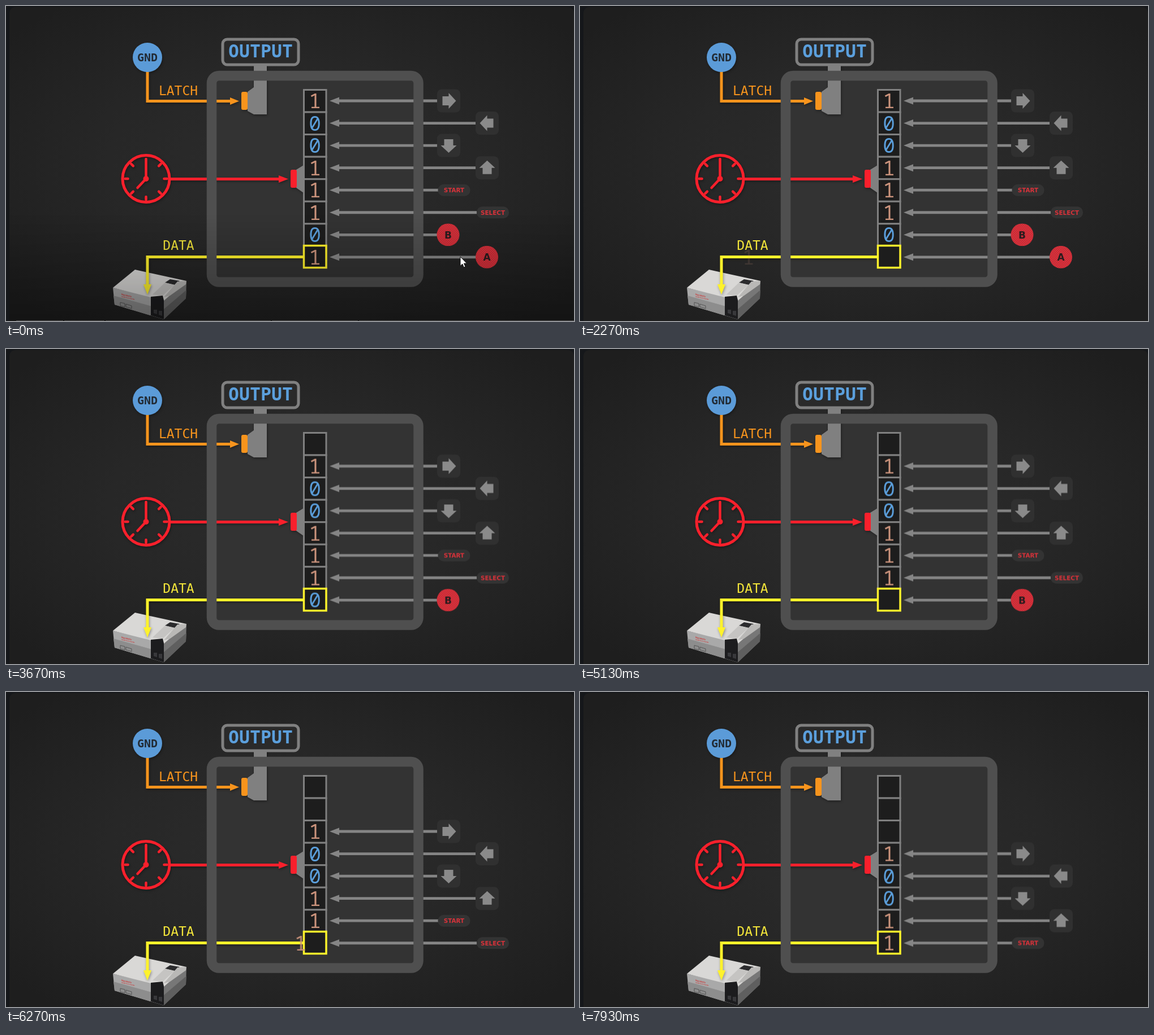
Animation, 1004 px wide and 558 px high, one loop 8000 ms. Source, as an HTML page:

```html
<!DOCTYPE html>
<html lang="en">
<head>
<meta charset="utf-8">
<title>Shift register</title>
<style>
html, body { margin: 0; width: 100%; height: 100%; overflow: hidden; background: #15171a; }
svg { display: block; width: 100vw; height: 100vh; }
text { text-anchor: middle; }
.label { font: 23px "DejaVu Sans Mono", monospace; }
.bold { font-weight: 700; }
.bit { font: 36px "Noto Sans Mono", monospace; fill: #cb937c; }
.zero { fill: #5b9fdc; }
.pad { font: 700 10.4px "DejaVu Sans", sans-serif; fill: #d9323a; }
.round { font: 700 17px "DejaVu Sans", sans-serif; fill: #2b1c1e; }
.wire { fill: none; stroke-width: 5; }
.shadow { filter: drop-shadow(1px 2px 2px rgba(0, 0, 0, .35)); }

#rows, .out7, .out6, .out5, .fade7, .fade6, .fade5, #cursor, #shade, #bezel {
  animation: 8s linear infinite both;
}
#rows { animation-name: shift; animation-timing-function: ease-in-out; }
.out7, .out6, .out5 { animation-timing-function: cubic-bezier(.45, 0, .55, 1); }
.out7 { animation-name: out7; }
.out6 { animation-name: out6; }
.out5 { animation-name: out5; }
.fade7 { animation-name: fade7; }
.fade6 { animation-name: fade6; }
.fade5 { animation-name: fade5; }
#cursor { animation-name: cursor; }
#shade { animation-name: shade; }
#bezel { animation-name: bezel; }

@keyframes shift {
  0%, 38.375% { transform: translateY(0); }
  44.125%, 65.875% { transform: translateY(39.5px); }
  71.625%, 93.375% { transform: translateY(79px); }
  98.75%, 100% { transform: translateY(118.5px); }
}
@keyframes out7 {
  0%, 21.25% { transform: none; opacity: 1; }
  31.25%, 100% { transform: translateX(-296px); opacity: 0; }
}
@keyframes out6 {
  0%, 48.75% { transform: none; opacity: 1; }
  58.75%, 100% { transform: translateX(-296px); opacity: 0; }
}
@keyframes out5 {
  0%, 76.25% { transform: none; opacity: 1; }
  86.25%, 100% { transform: translateX(-296px); opacity: 0; }
}
@keyframes fade7 { 0%, 38.375% { opacity: 1; } 41%, 100% { opacity: 0; } }
@keyframes fade6 { 0%, 65.875% { opacity: 1; } 68.5%, 100% { opacity: 0; } }
@keyframes fade5 { 0%, 93.375% { opacity: 1; } 96%, 100% { opacity: 0; } }
@keyframes cursor {
  0%, .875% { transform: translate(803px, 444px); }
  3.375%, 9.125% { transform: translate(769px, 420px); }
  14.125% { transform: translate(438px, 483px); }
  18.125%, 100% { transform: translate(300px, 564px); }
}
@keyframes shade { 0%, 21.25% { opacity: 1; } 24.4%, 100% { opacity: 0; } }
@keyframes bezel {
  0%, 9.3% { transform: translate(545px, 306px) scale(1); opacity: 0; }
  9.31% { transform: translate(545px, 306px) scale(1); opacity: 1; }
  15.56%, 100% { transform: translate(545px, 306px) scale(2); opacity: 0; }
}
</style>
</head>
<body>
<svg viewBox="0 0 1004 558" preserveAspectRatio="none">
  <defs>
    <radialGradient id="bg" cx=".5" cy=".5" r=".65">
      <stop offset="0" stop-color="#2c2c2c"/>
      <stop offset=".5" stop-color="#272727"/>
      <stop offset="1" stop-color="#1e1e1e"/>
    </radialGradient>
    <linearGradient id="dim" x1="0" y1="0" x2="0" y2="1">
      <stop offset="0" stop-opacity="0"/>
      <stop offset=".4" stop-opacity=".13"/>
      <stop offset="1" stop-opacity=".32"/>
    </linearGradient>
    <pattern id="mesh" width="4" height="4" patternUnits="userSpaceOnUse">
      <rect width="4" height="4" fill="#dc323c"/>
      <path d="M0 0L4 4M4 0L0 4" stroke="#b82a33" stroke-width=".7"/>
    </pattern>
  </defs>

  <rect width="1004" height="558" fill="#15171a"/>
  <path d="M6 558V14Q6 2 18 2H992Q1004 2 1004 14V558Z" fill="url(#bg)"/>

  <!-- register body -->
  <rect x="363" y="123" width="366" height="366" rx="12" fill="#333"/>
  <g class="shadow">
    <path d="M438 100H461V192H438L427 186V152L438 144Z" fill="#808080"/>
    <rect x="416" y="152" width="11" height="32" rx="3" fill="#f7941d"/>
    <path d="M513 290L526 282V331L513 322Z" fill="#808080"/>
    <rect x="503" y="290" width="11" height="32" rx="3" fill="#f9202c"/>
  </g>
  <rect x="383" y="59" width="134" height="45" rx="8" fill="#2a2a2a" stroke="#808080" stroke-width="5"/>
  <text class="label bold" x="450" y="91" style="font-size:31.5px" fill="#5b9fdc">OUTPUT</text>
  <g id="cells" fill="#1d1d1d" stroke="#808080" stroke-width="3"></g>

  <!-- console -->
  <g>
    <path d="M189 499L279 520V555L192 529Z" fill="#a9a9a9"/>
    <path d="M190 513L279 538V555L192 529Z" fill="#8d8d8d"/>
    <path d="M279 520L319 487L318 518L279 555Z" fill="#777"/>
    <path d="M279 537L319 503L318 518L279 555Z" fill="#5f5f5f"/>
    <path d="M228 467L319 487L279 522L189 499Z" fill="#d9d8d6"/>
    <path d="M290 484L307 487L298 494L281 490Z" fill="#2b2b2d"/>
    <path d="M281 490L298 494L277 513L259 511Z" fill="#c5c4c2"/>
    <path d="M303 488L319 487L318 493L290 513L279 516Z" fill="#b9b8b6"/>
    <path d="M256 515L277 513L279 521V555L256 548Z" fill="#1c1c1e"/>
    <path d="M261 538h6v8l-6-2ZM270 540h6v9l-6-2Z" fill="#38383b"/>
    <path d="M202 525l8 2v6l-8-2ZM212 528l10 3v5l-10-3Z" fill="none" stroke="#555"/>
    <g transform="matrix(1 .23 0 1 204 512)" fill="#cf2c2c" font-family="Lato, sans-serif" font-weight="700">
      <text style="text-anchor:start" font-size="4">Numbrelo</text>
      <text style="text-anchor:start" y="3.5" font-size="2.4">HOME PLAY SYSTEM</text>
    </g>
  </g>

  <!-- signals -->
  <g class="shadow">
    <path class="wire" d="M250 112V168.500H398" stroke="#f7941d"/>
    <path d="M396 162L412 168.500L396 175Z" fill="#f7941d"/>
    <path class="wire" d="M288 306.500H484" stroke="#f9202c"/>
    <path d="M482 300L499 306.500L482 313Z" fill="#f9202c"/>
    <path class="wire" d="M525 444.500H250V495" stroke="#fff22b"/>
    <path d="M243 493H257L250 511Z" fill="#fff22b"/>
    <circle cx="250" cy="91" r="26" fill="#5b9bd8"/>
    <g id="clock" transform="translate(247.500 306)" fill="none" stroke="#f9202c" stroke-width="4.500" stroke-linecap="round">
      <circle r="41.500" stroke-width="5"/>
      <path d="M0 0V-35M0 0L-15 16"/>
      <circle r="5" fill="#f9202c" stroke="none"/>
    </g>
  </g>
  <text class="label bold" x="250" y="98" style="font-size:20px" fill="#222b35">GND</text>
  <text class="label" x="304.500" y="158" fill="#f7941d">LATCH</text>
  <text class="label" x="305" y="432" fill="#f4e63a">DATA</text>

  <rect x="526.500" y="424.500" width="39.500" height="39" fill="none" stroke="#fff22b" stroke-width="3.500"/>
  <g id="rows"></g>
  <rect x="363.500" y="123.500" width="365.500" height="365.500" rx="13" fill="none" stroke="#4f4f4f" stroke-width="17.500"/>

  <!-- player layer -->
  <g id="bezel">
    <circle r="26" fill="#000" fill-opacity=".5"/>
    <path d="M-6 -8L8 0L-6 8Z" fill="#fff"/>
  </g>
  <g id="shade">
    <rect x="6" y="370" width="998" height="188" fill="url(#dim)"/>
    <path d="M18 557.500H101M103 557.500H174M176 557.500H468M470 557.500H622M624 557.500H1004" stroke="#fff" stroke-opacity=".25"/>
  </g>
  <path id="cursor" d="M0 0V16.500L3.800 13L6.400 19L9 17.800L6.500 12H11.500Z" fill="#fff" stroke="#111" stroke-width="1"/>
</svg>
<script>
const $ = id => document.getElementById(id);
const TOP = 168, STEP = 39.55, NEAR = 782.5, FAR = 850.5;

const arrowPad = (x, turn) => `
  <rect x="${x - 20.5}" y="-20.500" width="41" height="41" rx="8" fill="#303030"/>
  <path transform="translate(${x}) rotate(${turn})" d="M-11 -8H0V-14L13 0L0 14V8H-11Z" fill="#8a8a8a"/>`;
const pill = (x, name) => `
  <rect x="${x - 28.5}" y="-10.500" width="57" height="21" rx="10" fill="#333"/>
  <text class="pad" x="${x}" y="3.800">${name}</text>`;
const ball = (x, name) => `
  <circle cx="${x}" r="20" fill="url(#mesh)"/>
  <text class="round" x="${x}" y="6.300">${name}</text>`;

// bit, end of line, button
const rows = [
  [1, 762, arrowPad(NEAR, 0)],
  [0, 830, arrowPad(FAR, 180)],
  [0, 762, arrowPad(NEAR, 90)],
  [1, 830, arrowPad(FAR, -90)],
  [1, 764, pill(792, "START")],
  [1, 832, pill(860.5, "SELECT")],
  [0, 763, ball(781.5, "B")],
  [1, 831, ball(850, "A")]
];

$("cells").innerHTML = rows.slice(0, 7).map((_, i) =>
  `<rect x="526.500" y="${148.5 + i * STEP}" width="39.500" height="${STEP}"/>`).join("") +
  `<rect x="526.500" y="424.500" width="39.500" height="39" stroke="none"/>`;

$("rows").innerHTML = rows.map(([bit, end, button], i) => `
  <g transform="translate(0 ${TOP + i * STEP})">
    <g class="fade${i}">
      <path d="M588 0H${end}" stroke="#858585" stroke-width="4.800"/>
      <path d="M572 0L589 -6.500V6.500Z" fill="#858585"/>
      ${button}
    </g>
    <g class="out${i}"><text class="bit${bit ? "" : " zero"}" x="546" y="13">${bit}</text></g>
  </g>`).join("");

for (let a = 45; a < 360; a += 45) {
  $("clock").insertAdjacentHTML("beforeend", `<path transform="rotate(${a})" d="M0 -32V-37"/>`);
}
</script>
</body>
</html>
```
